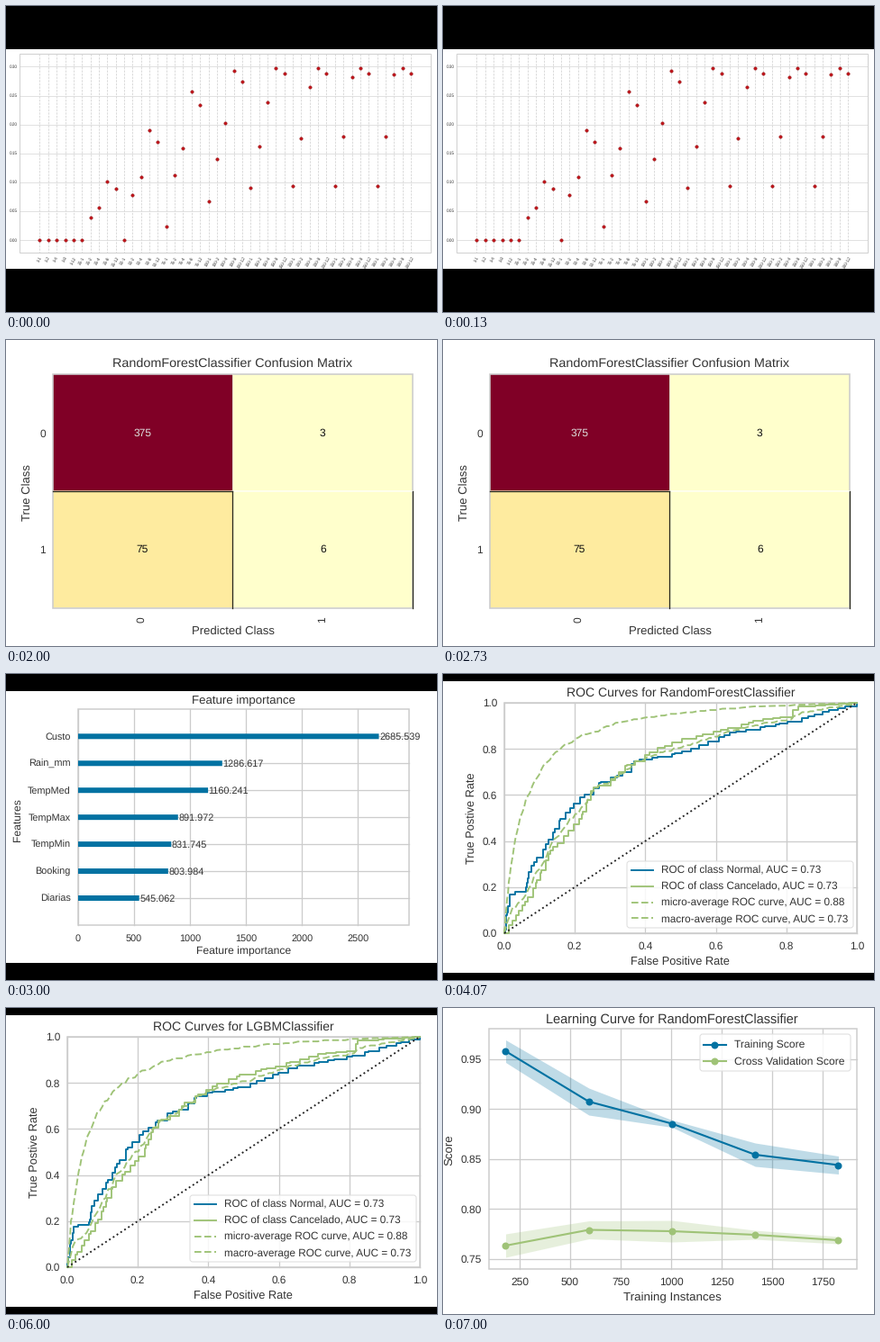
These frames come from a looping animation (478x340 px, 7990 ms). A matplotlib script:

```python
import matplotlib.pyplot as plt
import numpy as np
from matplotlib.animation import FuncAnimation
from matplotlib.patches import FancyBboxPatch, Rectangle

W, H, DPI = 478, 340, 100
LOOP, STEP, HOLD = 7990, 34, 1000
PX = 72 / DPI
INK, GRID, BLUE, GREEN = "#333333", "#cccccc", "#0272a2", "#9fc377"

plt.rcParams["text.hinting"] = "none"
plt.rcParams["font.family"] = "Liberation Sans"
fig = plt.figure(figsize=(W / DPI, H / DPI), dpi=DPI, facecolor="black")


def slide(top, bottom):
    """Full-stage axes in pixel units with a white band."""
    ax = fig.add_axes([0, 0, 1, 1], label=f"slide{len(fig.axes)}")
    ax.set(xlim=(0, W), ylim=(H, 0))
    ax.axis("off")
    rect(ax, 0, top, W, bottom, "white")
    return ax


def layer(ax):
    """Paint in call order."""
    return len(ax.get_children())


def rect(ax, x0, y0, x1, y1, face="none", edge="none", lw=0.0):
    ax.add_patch(Rectangle((x0, y0), x1 - x0, y1 - y0, facecolor=face,
                           edgecolor=edge, lw=lw * PX, zorder=layer(ax),
                           snap=lw > 0))


def line(ax, x, y, color=GRID, lw=1.3, **kw):
    ax.plot(x, y, color=color, lw=lw * PX, zorder=layer(ax), **kw)


def text(ax, x, y, s, size, ha="center", color=INK, **kw):
    """Horizontal text whose capitals are centred on y."""
    ax.text(x, y + 0.36 * size - 0.4, s, fontsize=size * PX, ha=ha,
            va="baseline", color=color, zorder=layer(ax), **kw)


def turned(ax, x, y, s, size, angle=90, va="center"):
    ax.text(x, y, s, fontsize=size * PX, ha="center", va=va, rotation=angle,
            color=INK, zorder=layer(ax))


def grid(ax, box, xs, ys, **kw):
    x0, y0, x1, y1 = box
    for x in xs:
        line(ax, [x, x], [y0, y1], **kw)
    for y in ys:
        line(ax, [x0, x1], [y, y], **kw)


def legend_box(ax, x0, y0, x1, y1):
    ax.add_patch(FancyBboxPatch(
        (x0 + 3, y0 + 3), x1 - x0 - 6, y1 - y0 - 6,
        boxstyle="round,pad=3,rounding_size=3", facecolor=(1, 1, 1, 0.85),
        edgecolor="#dddddd", lw=PX, zorder=layer(ax)))


def scatter_slide():
    ax = slide(48, 292)
    box = (15, 53, 471, 274)
    trees = [1, 25, 50, 75, 100, 150, 200, 250, 300]
    # Per depth: final score, group where the rise starts, groups it takes.
    rises = {1: (0.0945, 2.5, 3), 2: (0.18, 0, 7), 4: (0.287, 0, 8),
             8: (0.297, 0, 4.5), 12: (0.288, 0, 5)}
    xs = np.linspace(37.5, 449, len(trees) * len(rises))
    base, scale = 260.3, 643
    ticks = np.arange(7) * 0.05
    grid(ax, box, xs, [], color="#d2d2d2", lw=0.8, ls=(0, (3, 1.5)))
    grid(ax, box, [], base - scale * ticks, color="#dadada", lw=0.8)
    rect(ax, *box, edge="#d0d0d0", lw=1)
    for t in ticks:
        text(ax, 13, base - scale * t, f"{t:.2f}", 4.6, "right")
    names, scores = [], []
    for group, n in enumerate(trees):
        for depth, (top, start, span) in rises.items():
            names.append(f"{n}-{depth}")
            part = np.clip((group - start) / span, 0, 1)
            scores.append(top * np.sin(np.pi / 2 * part))
    for x, name in zip(xs, names):
        turned(ax, x - 0.5, 277.5, name, 4.8, 60, "top")
    line(ax, xs, base - scale * np.array(scores), "#c4161c", ls="none",
         marker="o", ms=3.4 * PX, mew=0.5 * PX, mec="#8e1014")


def report(counts):
    """Classification report lines for a 2x2 confusion matrix."""
    counts = np.array(counts)
    hits, support = counts.diagonal(), counts.sum(axis=1)
    precision, recall = hits / counts.sum(axis=0), hits / support
    f1 = 2 * precision * recall / (precision + recall)
    scores = np.array([precision, recall, f1])
    total = support.sum()

    def row(name, values, n):
        return [name] + [f"{v:.2f}" for v in values] + [str(n)]

    return [["", "precision", "recall", "f1-score", "support"], [],
            row("0", scores[:, 0], support[0]),
            row("1", scores[:, 1], support[1]), [],
            ["accuracy", "", "", f"{hits.sum() / total:.2f}", str(total)],
            row("macro avg", scores.mean(axis=1), total),
            row("weighted avg", scores @ support / total, total), []]


def report_slide():
    ax = slide(0, H)
    rows = report([[472, 5], [90, 6]]) + report([[1879, 5], [296, 110]])
    rights = [122.7] + [203.9 + 74 * i for i in range(4)]
    for i, cells in enumerate(rows):
        for x, cell in zip(rights, cells):
            text(ax, x, 13.5 + 19.44 * i, cell, 12.3, "right",
                 family="DejaVu Sans Mono")


def matrix_slide():
    ax = slide(0, H)
    x0, xm, x1, y0, ym, y1 = 52, 251.5, 451, 38, 167.5, 297.5
    rect(ax, x0, y0, xm, ym, "#800026")
    rect(ax, xm, y0, x1, ym, "#ffffcc")
    rect(ax, x0, ym, xm, y1, "#feeb9f")
    rect(ax, xm, ym, x1, y1, "#ffffcc")
    rect(ax, x0, y0, x1, y1, edge=GRID, lw=1.6)
    line(ax, [xm, xm], [y0, ym], "#e0dcc8", 1)
    line(ax, [xm, x1], [ym, ym], "#fffff4", 1.5)
    for xs, ys in (([x0, xm], [ym, ym]), ([xm, xm], [ym, y1]), ([x1, x1], [ym, y1])):
        line(ax, xs, ys, "#2a2a20", 1.3)
    text(ax, 151.5, 103, "375", 12, color="#dddddd")
    text(ax, 350.5, 103, "3", 12, color="#111111")
    text(ax, 151, 232, "75", 12, color="#111111")
    text(ax, 351.5, 232, "6", 12, color="#111111")
    text(ax, 251, 25.5, "RandomForestClassifier Confusion Matrix", 14.4)
    text(ax, 251.5, 323, "Predicted Class", 13.1)
    turned(ax, 24, 170, "True Class", 13.1)
    for name, x, y in (("0", 150, 104), ("1", 350.5, 233.5)):
        text(ax, 44, y, name, 12, "right")
        turned(ax, x, 311, name, 12)


def importance_slide():
    ax = slide(19, 321)
    box = (80, 39, 447.5, 279)
    unit = 0.1242
    ticks = range(0, 2501, 500)
    items = {"Custo": 2685.539, "Rain_mm": 1286.617, "TempMed": 1160.241,
             "TempMax": 891.972, "TempMin": 831.745, "Booking": 803.984,
             "Diarias": 545.062}
    ys = [69.3 + 29.95 * i for i in range(len(items))]
    grid(ax, box, [80 + t * unit for t in ticks], ys)
    rect(ax, *box, edge=GRID, lw=1.5)
    for (name, value), y in zip(items.items(), ys):
        end = 80 + value * unit
        rect(ax, 80, y - 3, end, y + 3, BLUE)
        text(ax, end + 0.5, y, f"{value:.3f}", 10.9, "left")
        text(ax, 71.8, y + 0.5, name, 10.9, "right")
    for t in ticks:
        text(ax, 80 + t * unit, 293, str(t), 10.9)
    text(ax, 263.5, 29, "Feature importance", 13.25)
    text(ax, 263.5, 308, "Feature importance", 12.1)
    turned(ax, 12.5, 162, "Features", 12.1)


def correlations(names):
    """Notable pairs over weak seeded ones; the last column leans negative."""
    notable = {
        "TempMed TempMax": 0.928443, "TempMed TempMin": 0.893834,
        "TempMax TempMin": 0.724751, "Diarias Custo": 0.430747,
        "Booking Status": 0.266000, "Booking Quarto": -0.179674,
        "Ocupa Quarto": -0.486075, "Rain_mm Booking": -0.027063,
        "Rain_mm Ocupa": -0.025310, "Ocupa Diarias": -0.012804}
    n = len(names)
    corr = np.triu(np.abs(np.random.default_rng(4).normal(0.06, 0.05, (n, n))), 1)
    corr[:, -1] *= -0.6
    for pair, value in notable.items():
        a, b = map(names.index, pair.split())
        corr[a, b] = value
    return corr + corr.T + np.eye(n)


def correlation_slide():
    ax = slide(83.5, 256.5)
    names = ["Rain_mm", "TempMed", "TempMax", "TempMin", "Booking", "Ocupa",
             "Diarias", "Custo", "Status", "Quarto"]
    # Columns narrow slightly from left to right.
    rights = [84 + 44.4 * i - 0.22 * i * i for i in range(len(names))]
    bold = dict(weight="bold", color="#222222")
    rect(ax, 5, 88, 470, 106, "#ebebeb")
    for x, name in zip(rights, names):
        text(ax, x, 97, name, 8.1, "right", **bold)
    for i, (name, row) in enumerate(zip(names, correlations(names))):
        y = 112.4 + 14.5 * i
        if i % 2:
            rect(ax, 5, y - 7.2, 470, y + 7.2, "#f4f4f4")
        text(ax, 7.5, y, name, 7.3, "left", **bold)
        for x, value in zip(rights, row):
            text(ax, x, y, f"{value:.6f}", 8.3, "right")


def staircase(points, count, seed):
    """Slightly irregular points along a polyline, to be joined by steps."""
    x, y = np.array(points).T
    run = np.concatenate([[0], np.cumsum(np.hypot(np.diff(x), np.diff(y)))])
    at = np.arange(count + 1.0)
    at[1:-1] += np.random.default_rng(seed).uniform(-0.45, 0.45, count - 1)
    at *= run[-1] / count
    return np.interp(at, run, x), np.interp(at, run, y)


def roc_curves(seed):
    """Both class curves (mirror images), their mean and the pooled curve."""
    knots = [(0, 0), (0.008, 0.1), (0.018, 0.18), (0.06, 0.185), (0.072, 0.28),
             (0.12, 0.39), (0.16, 0.5), (0.2, 0.57), (0.24, 0.615),
             (0.28, 0.665), (0.33, 0.69), (0.37, 0.75), (0.5, 0.785),
             (0.64, 0.87), (0.8, 0.916), (1, 1)]
    x, y = staircase(knots, 62, seed)
    x, y = np.repeat(x, 2)[1:], np.repeat(y, 2)[:-1]
    mirror = 1 - y[::-1], 1 - x[::-1]
    across = np.linspace(0, 1, 130)
    mean = (np.interp(across, x, y) + np.interp(across, *mirror)) / 2
    rng = np.random.default_rng(seed)
    fpr = np.linspace(0, 1, 90) ** 2
    pooled = 1 - (1 - fpr) / (1 + 20 * fpr) + rng.normal(0, 0.007, 90) * (1 - fpr)
    pooled = np.maximum.accumulate(np.clip(pooled, 0, 1))
    return (x, y), mirror, (fpr, pooled), (across, mean)


def roc_slide(model, seed):
    ax = slide(8, 332)
    box = x0, y0, x1, y1 = 68, 32, 459, 288

    def place(x, y):
        return x0 + (x1 - x0) * x, y1 - (y1 - y0) * y

    ticks = np.linspace(0, 1, 6)
    xs, ys = place(ticks, ticks)
    grid(ax, box, xs, ys)
    rect(ax, *box, edge=GRID, lw=1.5)
    dash = (0, (4, 1.8))
    names = ["ROC of class Normal, AUC = 0.73",
             "ROC of class Cancelado, AUC = 0.73",
             "micro-average ROC curve, AUC = 0.88",
             "macro-average ROC curve, AUC = 0.73"]
    looks = list(zip((BLUE, GREEN, GREEN, GREEN), ("-", "-", dash, dash)))
    for curve, (color, style) in zip(roc_curves(seed), looks):
        line(ax, *place(*curve), color, 1.9, ls=style)
    line(ax, [x0, x1], [y1, y0], "#222222", 1.9, ls=":")
    legend_box(ax, 204, 208, 455, 282)
    for i, (name, (color, style)) in enumerate(zip(names, looks)):
        y = 218 + 17.8 * i
        line(ax, [209, 233], [y, y], color, 1.9, ls=style)
        text(ax, 242, y, name, 11.7, "left")
    for t, x, y in zip(ticks, xs, ys):
        text(ax, x, 302, f"{t:.1f}", 11.7)
        text(ax, 60, y + 0.5, f"{t:.1f}", 11.7, "right")
    text(ax, 263.5, 20.5, f"ROC Curves for {model}", 14)
    text(ax, 263, 318.3, "False Positive Rate", 12.8)
    turned(ax, 31.5, 160, "True Postive Rate", 12.8)


def learning_slide():
    ax = slide(0, H)
    box = (51, 23, 459, 289.5)
    xs = [85 + 56 * i for i in range(7)]
    ys = [56.5 + 55.5 * i for i in range(5)]
    grid(ax, box, xs, ys)
    rect(ax, *box, edge=GRID, lw=1.5)
    sizes = np.linspace(69.5, 438.5, 5)
    # Name, colour, mean heights and half-widths of the band.
    curves = [
        ("Training Score", BLUE, [48, 104, 128.5, 163, 174.5],
         [12.5, 15, 4, 13, 10]),
        ("Cross Validation Score", GREEN, [264, 246.5, 248, 252, 258],
         [13, 10, 12, 5, 4]),
    ]
    for _, color, mean, half in curves:
        ax.fill_between(sizes, np.subtract(mean, half), np.add(mean, half),
                        color=color, alpha=0.25, lw=0, zorder=layer(ax))
    dots = dict(marker="o", ms=8 * PX, mew=0)
    for _, color, mean, _ in curves:
        line(ax, sizes, mean, color, 2.1, **dots)
    legend_box(ax, 285, 29, 452, 70)
    for i, (name, color, *_) in enumerate(curves):
        y = 40.5 + 18 * i
        line(ax, [289, 301.5, 314], [y] * 3, color, 2.1, markevery=[1], **dots)
        text(ax, 323, y, name, 12.1, "left")
    for i, x in enumerate(xs):
        text(ax, x, 303.5, str(250 * (i + 1)), 12)
    for i, y in enumerate(ys):
        text(ax, 42.5, y + 0.5, f"{0.95 - 0.05 * i:.2f}", 12, "right")
    text(ax, 253.5, 12, "Learning Curve for RandomForestClassifier", 14.55)
    text(ax, 254, 321, "Training Instances", 13.4)
    turned(ax, 7, 158, "Score", 13.2)


scatter_slide()
report_slide()
matrix_slide()
importance_slide()
roc_slide("RandomForestClassifier", 11)
correlation_slide()
roc_slide("LGBMClassifier", 3)
learning_slide()
slides = list(fig.axes)


def show(frame):
    # The slide in view at the end of this frame's interval.
    current = (frame * STEP + STEP - 1) // HOLD
    for i, ax in enumerate(slides):
        ax.set_visible(i == current)
    return slides


show(0)
anim = FuncAnimation(fig, show, frames=LOOP // STEP, interval=STEP,
                     repeat=True, repeat_delay=0, blit=False)
plt.show()
```
